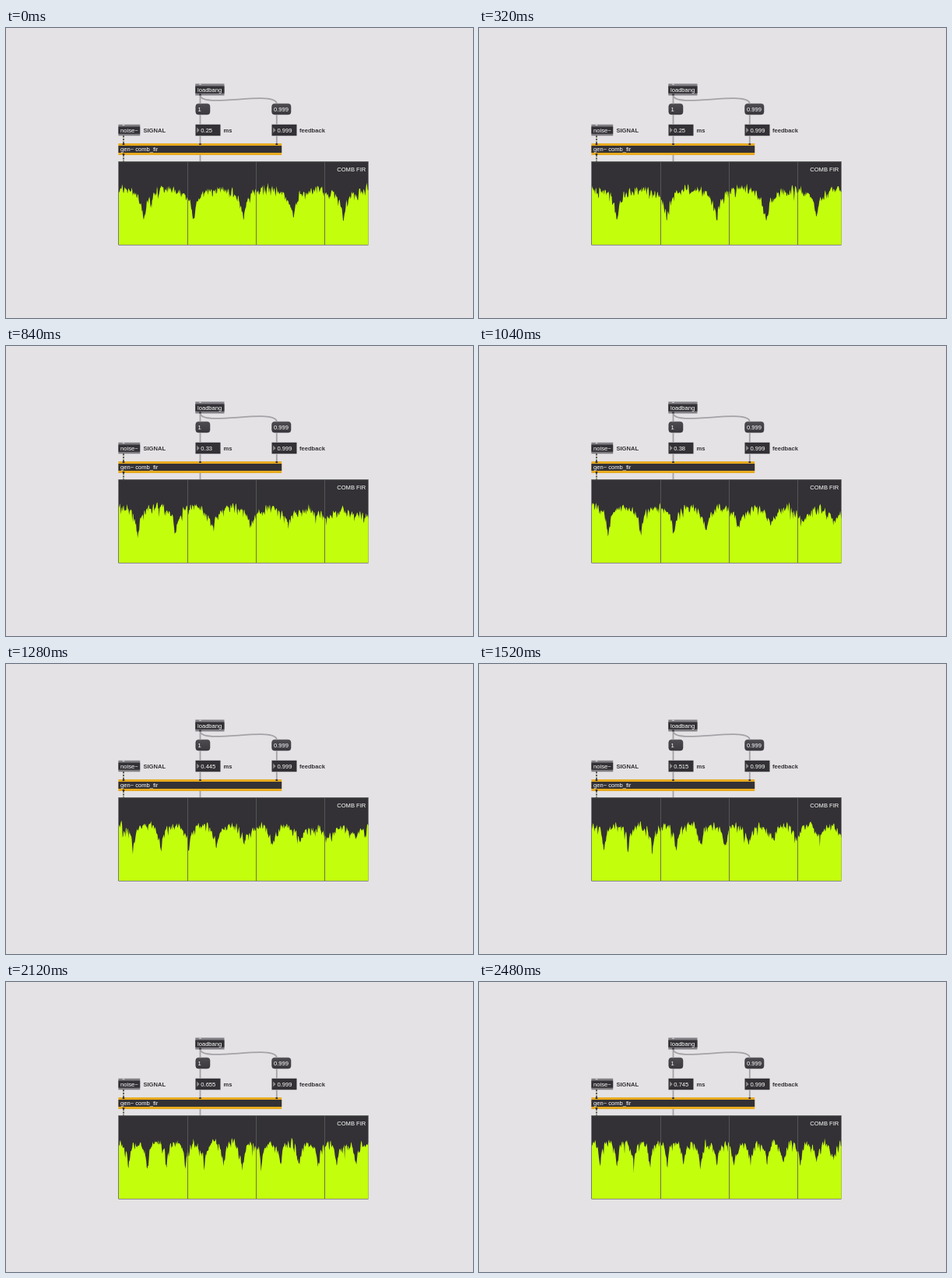
An HTML page for the animation above (2520 ms loop, 600 by 372 pixels).

```html
<!DOCTYPE html>
<html lang="en">
<head>
<meta charset="utf-8">
<title>Comb filter patch</title>
<style>
  html, body { margin: 0; width: 100%; height: 100%; overflow: hidden; background: #e4e2e5; }
  svg { display: block; width: 600px; height: 372px; }
  text { font: 7.6px "Liberation Sans", Arial, sans-serif; fill: #fff; }
  .label { font-weight: bold; fill: #333135; }
  .body { fill: #333135; }
  .edge { fill: #817f83; }
  .gold { fill: #e8ab1f; }
  .msg { fill: url(#shade); stroke: #333135; stroke-width: .5; }
  .tri { fill: #8e8c90; }
  .cord { fill: none; stroke: #a4a2a6; stroke-width: 1.8; }
  .signal { stroke: #c6cca4; stroke-width: 1.4; }
  .dash { stroke: #2d2c2e; stroke-width: 1.4; stroke-dasharray: 2.2 1.7; }
  .grid { stroke: #5c5c5c; stroke-opacity: .85; }
  .rim { stroke: #5f655f; stroke-width: .7; }
</style>
</head>
<body>
<svg viewBox="0 0 600 372">
  <defs>
    <linearGradient id="shade" x2="0" y2="1">
      <stop stop-color="#4d4b50"/>
      <stop offset="1" stop-color="#3b393e"/>
    </linearGradient>
  </defs>

  <!-- objects -->
  <path class="edge" d="M243.3 71.5h37.2v15h-37.2zM144.4 123.7h27.8v14.6h-27.8z"/>
  <path class="body" d="M243.3 74.4h37.2v9.4h-37.2zM144.4 126.4h27.8v9.4h-27.8z"/>
  <path class="body" d="M243.5 123.7h32v14.6h-32zM341.5 123.7h32v14.6h-32z"/>
  <path class="tri" d="M245.2 127.6l3.4 3.4-3.4 3.4zM343.2 127.6l3.4 3.4-3.4 3.4z"/>
  <path class="gold" d="M144.4 148h209.8v15h-209.8z"/>
  <path class="body" d="M144.4 151h209.8v9h-209.8z"/>
  <rect class="msg" x="243.8" y="97.2" width="18.2" height="13.8" rx="3.5"/>
  <rect class="msg" x="341.6" y="97.2" width="24.4" height="13.8" rx="3.5"/>

  <!-- patch cords -->
  <path class="cord" d="M249.5 86v11.2M249.5 111v12.7M249.5 138.3v10M249.5 163v8.5M347.8 111v12.7M347.8 138.3v10"/>
  <path class="cord" d="M249.5 86C249.5 104 347.8 79 347.8 97.2"/>
  <path class="signal" d="M151 138v10.5M151 162.5v9"/>
  <path class="dash" d="M151 138v10.5M151 162.5v9"/>
  <path class="body" d="M248.2 148h2.6v2h-2.6zM346.5 148h2.6v2h-2.6zM149.7 148h2.6v2h-2.6zM149.7 161h2.6v2h-2.6zM248.2 84.4h2.6v2h-2.6z"/>
  <path fill="#c9c8ca" d="M248.2 71.5h2.6v1.6h-2.6zM149.7 123.7h2.6v1.6h-2.6z"/>

  <text x="246" y="81.6">loadbang</text>
  <text x="246.5" y="106.7">1</text>
  <text x="344" y="106.7">0.999</text>
  <text x="147" y="133.7">noise~</text>
  <text x="250.3" y="133.7" id="delay">0.25</text>
  <text x="348.4" y="133.7">0.999</text>
  <text x="147" y="158.2">gen~ comb_fir</text>
  <text class="label" x="176.4" y="133.6">SIGNAL</text>
  <text class="label" x="279.4" y="133.6">ms</text>
  <text class="label" x="377" y="133.6">feedback</text>

  <!-- spectroscope -->
  <path class="body" d="M144.4 171.2h321.2v107.2h-321.2z"/>
  <path id="spectrum" fill="#c3ff0d"/>
  <path class="grid" d="M233.5 172v106M321.5 172v106M409.5 172v106"/>
  <path class="rim" d="M144.4 171.6h321.2"/>
  <text x="425.2" y="184.3">COMB FIR</text>
</svg>
<script>
const LOOP = 2520, STEP = 40, FRAMES = LOOP / STEP;
const RATE = 44.1, FFT = 1024, BINS = 466;
const LEFT = 145, RIGHT = 465.6, BASE = 278, PX_PER_KHZ = 16;
const GAIN = 0.999, PEAK_Y = 206, PX_PER_DB = 1.35;
const WEIGHTS = [0.45, 0.3, 0.25];
// [time in ms, delay in ms]
const KEYS = [[0, .25], [520, .25], [840, .33], [1280, .445], [1520, .515], [2120, .655], [2480, .745], [2520, .755]];

const delayText = document.getElementById('delay');
const spectrum = document.getElementById('spectrum');

function random(seed) {
  return () => {
    seed = seed + 0x6D2B79F5 | 0;
    let t = Math.imul(seed ^ seed >>> 15, 1 | seed);
    t = t + Math.imul(t ^ t >>> 7, 61 | t) ^ t;
    return ((t ^ t >>> 14) >>> 0) / 4294967296;
  };
}

// White noise as complex Gaussian bins, one set per frame
const noise = Array.from({ length: FRAMES }, (_, f) => {
  const rnd = random(f * 7919 + 17);
  return Array.from({ length: BINS + 2 }, () => {
    const r = Math.sqrt(-2 * Math.log(1 - rnd())), a = 2 * Math.PI * rnd();
    return [r * Math.cos(a), r * Math.sin(a)];
  });
});

function delayAt(t) {
  const i = KEYS.findIndex(k => k[0] > t);
  const [t0, a] = KEYS[i - 1], [t1, b] = KEYS[i];
  const v = a + (b - a) * (t - t0) / (t1 - t0);
  return Math.round(v * 200) / 200;
}

// Feed-forward comb with a linearly interpolated delay line
function response(bin, delay) {
  const w = 2 * Math.PI * bin / FFT, n = delay * RATE;
  const whole = Math.floor(n), part = n - whole;
  const tap = fn => (1 - part) * fn(w * whole) + part * fn(w * (whole + 1));
  return [1 + GAIN * tap(Math.cos), -GAIN * tap(Math.sin)];
}

// Filtered noise power through a Hann window
function addPower(power, z, filter, weight) {
  const x = z.map(([a, b], i) => {
    const [c, d] = filter[i];
    return [a * c - b * d, a * d + b * c];
  });
  for (let k = 0; k < BINS; k++) {
    const part = j => x[k + 1][j] - (x[k][j] + x[k + 2][j]) / 2;
    power[k] += weight * (part(0) ** 2 + part(1) ** 2);
  }
}

function draw(frame) {
  const delay = delayAt(frame * STEP);
  const filter = noise[0].map((_, i) => response(i - 1, delay));
  const power = new Array(BINS).fill(0);
  WEIGHTS.forEach((w, i) => addPower(power, noise[(frame - i + FRAMES) % FRAMES], filter, w));

  let d = `M${LEFT} ${BASE}`;
  power.forEach((p, k) => {
    const x = Math.min(RIGHT, LEFT + k * RATE / FFT * PX_PER_KHZ);
    const y = PEAK_Y - PX_PER_DB * 10 * Math.log10(p / 12 + 5e-4);
    d += `L${x.toFixed(2)} ${y.toFixed(2)}`;
  });
  spectrum.setAttribute('d', `${d}H${RIGHT}V${BASE}Z`);
  delayText.textContent = String(+delay.toFixed(3));
}

let shown = -1;
function tick() {
  const frame = Math.floor(performance.now() % LOOP / STEP);
  if (frame !== shown) draw(shown = frame);
  requestAnimationFrame(tick);
}
tick();
</script>
</body>
</html>
```
